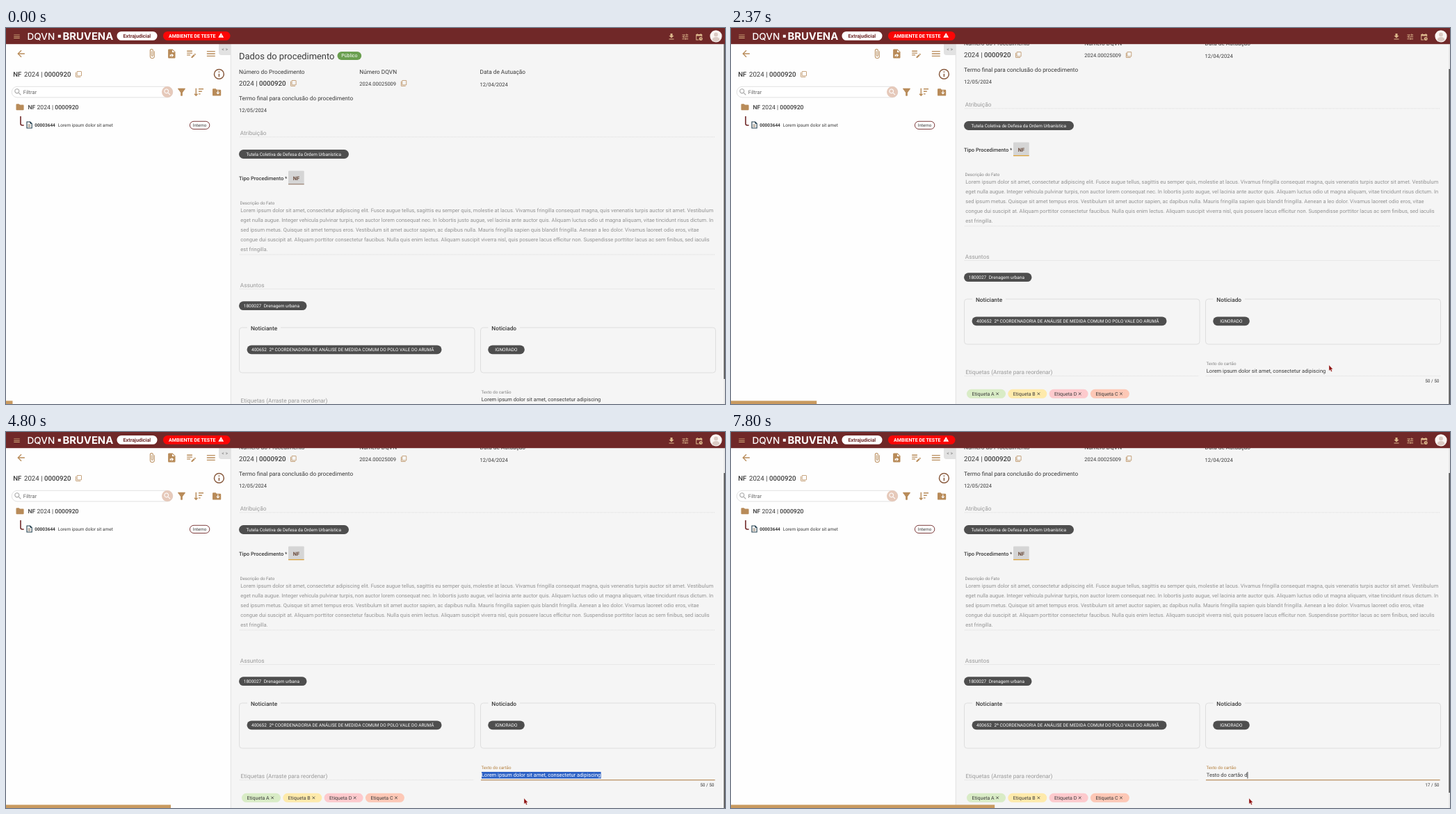
Write an HTML page that moves like this. It is 1034x541 px and loops after 8000 ms.

```html
<!DOCTYPE html>
<html lang="pt-BR">
<head>
<meta charset="utf-8">
<title>Dados do procedimento</title>
<style>
html, body { margin: 0; width: 100%; height: 100%; overflow: hidden; background: #f5f5f5; }
svg { display: block; width: 100vw; height: 100vh; }
text { font-family: Roboto, Arial, sans-serif; fill: #3a3a3a; text-rendering: geometricPrecision; }
.s11 { font-size: 6.2px; }
.s12 { font-size: 6.4625px; }
.s13 { font-size: 7px; }
.s14 { font-size: 7.54px; }
.s15 { font-size: 8.27px; }
.s16 { font-size: 8.62px; }
.s18 { font-size: 9.69px; }
.s24 { font-size: 12.925px; }
.m { font-weight: 500; }
.b { font-weight: 700; }
.mid { text-anchor: middle; }
.end { text-anchor: end; }
.dim { fill: #999; }
.para { fill: #929292; }
.w { fill: #fff; }
.chip { fill: #4e4e4e; }
.dots { stroke: #c9c9c9; stroke-width: .6; stroke-dasharray: 1 1; fill: none; }
.box { fill: none; stroke: #d8d8d8; stroke-width: .8; }
.logo { font-family: Inter, Arial, sans-serif; fill: #fff; }
.x { stroke: #333; stroke-width: .8; fill: none; }
</style>
</head>
<body>
<svg viewBox="0 0 1034 541" preserveAspectRatio="none">
  <defs>
    <clipPath id="picked"><rect id="pickedBox" y="488" height="12"/></clipPath>
  </defs>
  <rect width="1034" height="541" fill="#f5f5f5"/>

  <g id="page">
    <text class="s24" x="335" y="45">Dados do procedimento</text>
    <rect x="476.5" y="34" width="34.7" height="12" rx="6" fill="#6a9f50"/>
    <text class="s13 w mid" x="493.9" y="42.3">Público</text>
    <g class="s15">
      <text x="335" y="66.3">Número do Procedimento</text>
      <text x="508.3" y="66.3">Número DQVN</text>
      <text x="681.6" y="66.3">Data de Autuação</text>
      <text x="335" y="103.5">Termo final para conclusão do procedimento</text>
    </g>
    <text class="s18" x="335" y="83">2024 | <tspan class="m">0000920</tspan></text>
    <g class="s14">
      <text x="508.3" y="83">2024.00025009</text>
      <text x="681.6" y="83.6">12/04/2024</text>
      <text x="335" y="120.8">12/05/2024</text>
    </g>

    <text class="s15 dim" x="336.8" y="154.3">Atribuição</text>
    <path class="dots" d="M336 156.8H1020M336 326H1020M336 375.5H1020"/>
    <rect class="chip" x="335" y="175" width="158" height="13" rx="6.5"/>
    <text class="s12 w" x="345.4" y="183.8">Tutela Coletiva de Defesa da Ordem Urbanística</text>

    <text class="s14 m" x="335" y="218.8">Tipo Procedimento *</text>
    <rect x="406" y="205.5" width="22.7" height="19.8" rx="1" fill="#d5d5d5"/>
    <rect id="nfLine" x="406" y="224" width="22.7" height="1.3"/>
    <text class="s14 b mid" x="417.4" y="218.8" style="fill:#6a4b3b">NF</text>

    <text class="s11" x="336.4" y="254.4" style="fill:#858585">Descrição do Fato</text>
    <g class="s14" id="para"></g>

    <text class="s15 dim" x="336.8" y="372.5">Assuntos</text>
    <rect class="chip" x="335" y="393.3" width="97.5" height="12.8" rx="6.4"/>
    <text class="s12 w" x="341.8" y="402">1800027</text>
    <text class="s12 w" x="370.8" y="402">Drenagem urbana</text>

    <path class="box" d="M347 431H339.5a4 4 0 0 0-4 4V492a4 4 0 0 0 4 4H670a4 4 0 0 0 4-4V435a4 4 0 0 0-4-4H395"/>
    <path class="box" d="M693.5 431H686.5a4 4 0 0 0-4 4V492a4 4 0 0 0 4 4H1016.5a4 4 0 0 0 4-4V435a4 4 0 0 0-4-4H739"/>
    <text class="s15 m" x="352" y="434.7">Noticiante</text>
    <text class="s15 m" x="698.3" y="434.7">Noticiado</text>
    <rect class="chip" x="346.5" y="456.4" width="280" height="12.8" rx="6.4"/>
    <text class="s12 w" x="353" y="465.1">400652</text>
    <text class="s12 w" x="378.4" y="465.1">2ª COORDENADORIA DE ANÁLISE DE MEDIDA COMUM DO POLO VALE DO ARUMÃ</text>
    <rect class="chip" x="693.2" y="456.4" width="52.6" height="12.8" rx="6.4"/>
    <text class="s12 w mid" x="719.4" y="465.1">IGNORADO</text>

    <text class="s15 dim" x="337.6" y="539">Etiquetas (Arraste para reordenar)</text>
    <path class="dots" d="M336 541.7H672.5M683 541.7H1020"/>
    <g id="tags"></g>

    <text class="s11" id="cardLabel" x="683.4" y="526">Texto do cartão</text>
    <rect id="focusLine" x="683" y="541.2" width="336.5" height="1.1" fill="#b5864f"/>
    <text class="s12 end" id="count" x="1018.5" y="551.2"></text>
  </g>

  <g id="field">
    <text class="s14" id="value" x="683.8" y="496.3" xml:space="preserve"></text>
    <rect id="caret" y="489" width=".8" height="9.6" fill="#222"/>
    <g clip-path="url(#picked)">
      <rect x="683.8" y="489" width="172" height="9.6" fill="#2d62c6"/>
      <text class="s14 w" x="683.8" y="496.3">Lorem ipsum dolor sit amet, consectetur adipiscing</text>
    </g>
  </g>
  <rect x="1032.3" y="23" width="1.7" height="518" fill="#e6e6e6"/>
  <rect id="thumb" x="1032.3" width="1.7" fill="#5a5a5a"/>

  <rect y="23" width="323" height="518" fill="#fefefe"/>
  <rect x="322.8" y="23" width=".8" height="518" fill="#dcdcdc"/>
  <path d="M323 23H306v12a4 4 0 0 0 4 4h13z" fill="#e2e2e2"/>
  <text class="s13 mid" x="314.8" y="33.3" style="fill:#777">&lt; &gt;</text>
  <text class="s18 m" x="10.2" y="70.2">NF</text>
  <text class="s18" x="26" y="70.2">2024 | <tspan class="m">0000920</tspan></text>
  <rect x="8.3" y="84.3" width="231.5" height="15.6" rx="7.8" fill="#fff" stroke="#cfcfcf" stroke-width=".6"/>
  <text class="s14" x="24.8" y="94.8" style="fill:#666">Filtrar</text>
  <circle cx="232" cy="92.1" r="8" fill="#e6c9ba"/>
  <path d="M14.5 110.2q0-1 1-1h3.2l1.3 1.4h4.6q1 0 1 1v5.6q0 1-1 1h-9.1q-1 0-1-1z" fill="#b88b59"/>
  <text class="s16" x="31.5" y="116.6"><tspan class="m">NF</tspan> 2024 | <tspan class="m">0000920</tspan></text>
  <path d="M21 127V137.5q0 2.5 2.5 2.5h2.2" fill="none" stroke="#702828" stroke-width="1.6"/>
  <path d="M30 135h4.6l2.6 2.6v6.4h-7.2z" fill="#fff" stroke="#24404f" stroke-width="1.1"/>
  <path d="M34.4 134.6v3.2h3.2z" fill="#24404f"/>
  <path d="M31.6 139.6h3.6M31.6 141.8h3.6" stroke="#7d6a50"/>
  <text class="s12 b" x="41.2" y="141.9">00003644</text>
  <text class="s12" x="74.8" y="141.9">Lorem ipsum dolor sit amet</text>
  <rect x="264.4" y="134.3" width="28.4" height="11.2" rx="5.6" fill="#fff" stroke="#702828" stroke-width=".9"/>
  <text class="s11 mid" x="278.6" y="142.1">Interno</text>
  <path d="M273.3 86.8V97M271 94.8l2.3 2.4 2.3-2.4M277 87.7h7M277 91.3h4.8M277 94.9h2.7" fill="none" stroke="#b88b59" stroke-width="1.4"/>
  <path d="M297 88.5q0-1.2 1.2-1.2h3.4l1.4 1.5h5q1.2 0 1.2 1.2v6.4q0 1.2-1.2 1.2h-9.8q-1.2 0-1.2-1.2z" fill="#b88b59"/>
  <path d="M304.8 89.8v4.2M302.8 92.6l2 2.2 2-2.2" fill="none" stroke="#fff" stroke-width="1.1"/>

  <rect width="1034" height="23.2" fill="#702828"/>
  <text class="logo m" x="30.5" y="17" style="font-size:13.6px">DQVN</text>
  <rect x="74.8" y="9.8" width="4" height="4" fill="#fff"/>
  <text class="logo b" x="81.5" y="17" style="font-size:14.8px">BRUVENA</text>
  <rect x="159.5" y="5" width="58" height="12.8" rx="6.4" fill="#fff"/>
  <text class="b mid" x="188.4" y="13.9" style="font-size:7.2px;fill:#702828">Extrajudicial</text>
  <rect x="226" y="5" width="96.5" height="12.8" rx="6.4" fill="#fb0606"/>
  <text class="b w" x="234" y="14" style="font-size:7.05px">AMBIENTE DE TESTE</text>
  <circle cx="1021" cy="11.8" r="8.6" fill="#fbf6f3"/>
  <g fill="#dccbc4"><circle cx="1021" cy="9.4" r="2.9"/><path d="M1015.7 17.6q0-4.6 5.3-4.6t5.3 4.6q-5.3 3.6-10.6 0z"/></g>

  <g id="icons"></g>
  <rect id="bar" y="536.4" height="4.6" fill="#c99a5f"/>
  <circle id="press" r="10.7" fill="#fc6a4b" opacity=".92"/>
  <g id="beam">
    <circle r="6" fill="#f6c228" opacity=".85"/>
    <path d="M-1.5-4H1.5M0-4V4M-1.5 4H1.5" stroke="#a3660f" stroke-width=".8"/>
  </g>
  <path id="arrow" d="M0 0V8.2L1.8 6.6 3.1 9.4 4.5 8.8 3.2 6.1H5.5z" fill="#8d0f0f" stroke="#f0d8d4" stroke-width=".4"/>
</svg>
<script>
const $ = id => document.getElementById(id);
const NS = 'http://www.w3.org/2000/svg';

function add(parent, tag, attrs, content) {
  const el = document.createElementNS(NS, tag);
  for (const k in attrs) el.setAttribute(k, attrs[k]);
  if (content) el.textContent = content;
  parent.append(el);
}

function icon(parent, d, x, y, scale, fill = '#b88b59') {
  add(parent, 'path', { d, fill, transform: `translate(${x} ${y}) scale(${scale}) translate(-12 -12)` });
}

const COPY = 'M3 5H1v16c0 1.1.9 2 2 2h16v-2H3V5zm18-4H7c-1.1 0-2 .9-2 2v14c0 1.1.9 2 2 2h14c1.1 0 2-.9 2-2V3c0-1.1-.9-2-2-2zm0 16H7V3h14v14z';
const FIND = 'M15.5 14h-.79l-.28-.27A6.5 6.5 0 1 0 13.73 14.43l.27.28v.79l5 4.99L20.49 19zm-6 0a4.5 4.5 0 1 1 0-9 4.5 4.5 0 0 1 0 9z';
const MENU = 'M3 18h18v-2H3v2zm0-5h18v-2H3v2zm0-7v2h18V6H3z';
const GOLD = '#dcb88c';
const fixed = $('icons');

// header
icon(fixed, MENU, 15.5, 12.2, .47, '#d0a878');
icon(fixed, 'M1 21h22L12 2 1 21zm12-3h-2v-2h2v2zm0-4h-2v-4h2v4z', 309.2, 10.6, .36, '#fff');
icon(fixed, 'M5 20h14v-2H5v2zM19 9h-4V3H9v6H5l7 7 7-7z', 957, 12.6, .5, GOLD);
icon(fixed, 'M3 17v2h6v-2H3zM3 5v2h10V5H3zm10 16v-2h8v-2h-8v-2h-2v6h2zM7 9v2H3v2h4v2h2V9H7zm14 4v-2H11v2h10zm-6-4h2V7h4V5h-4V3h-2v6z', 976.8, 12.8, .48, GOLD);
icon(fixed, 'M3 4h3V2h2v2h8V2h2v2h3v7h-2V9H5v10h6v2H3zM17 12a5 5 0 1 1 0 10 5 5 0 0 1 0-10zm-.8 2v3.5l2.6 1.6.8-1.2-1.9-1.1V14z', 996.7, 13, .5, GOLD);
// side panel
icon(fixed, 'M20 11H7.83l5.59-5.59L12 4l-8 8 8 8 1.41-1.41L7.83 13H20z', 21.6, 37, .66);
icon(fixed, 'M16.5 6v11.5a4 4 0 0 1-8 0V5a2.5 2.5 0 0 1 5 0v10.5a1 1 0 0 1-2 0V6H10v9.5a2.5 2.5 0 0 0 5 0V5a4 4 0 0 0-8 0v12.5a5.5 5.5 0 0 0 11 0V6z', 210, 37, .64);
icon(fixed, 'M6 2c-1.1 0-2 .9-2 2v16c0 1.1.9 2 2 2h12c1.1 0 2-.9 2-2V8l-6-6z', 238.3, 37, .65);
icon(fixed, 'M13 3.5V9h5.5zM8 18v-4h4v-2.5l4.5 4-4.5 4V16h-2v2z', 238.3, 37, .65, '#fff');
icon(fixed, 'M3 10h11v2H3zm0-4h11v2H3zm0 8h7v2H3zm15-1.13.71-.71q.7-.6 1.41 0l.71.71q.6.7 0 1.41l-.71.71zm-.7.71-5.3 5.3V21h2.12l5.3-5.3z', 266.5, 36.8, .7);
icon(fixed, MENU, 294.8, 37, .66);
icon(fixed, 'M11 7h2v2h-2zm0 4h2v6h-2zM12 2a10 10 0 1 0 0 20 10 10 0 0 0 0-20zm0 18a8 8 0 1 1 0-16 8 8 0 0 1 0 16z', 306.4, 66.4, .77, '#8a5c40');
icon(fixed, COPY, 104.5, 66.5, .39);
icon(fixed, FIND, 17.2, 92.2, .55, '#aaa');
icon(fixed, FIND, 232, 92.2, .52, '#fff');
icon(fixed, 'M4.25 5.61C6.27 8.2 10 13 10 13v6q0 1 1 1h2q1 0 1-1v-6l5.74-7.39q.8-1.4-.79-1.61H5.04q-1.5.2-.79 1.61z', 252.5, 92.2, .68);
// page
icon($('page'), COPY, 413.3, 79.5, .38);
icon($('page'), COPY, 572, 79.5, .38);

[
  'Lorem ipsum dolor sit amet, consectetur adipiscing elit. Fusce augue tellus, sagittis eu semper quis, molestie at lacus. Vivamus fringilla consequat magna, quis venenatis turpis auctor sit amet. Vestibulum',
  'eget nulla augue. Integer vehicula pulvinar turpis, non auctor lorem consequat nec. In lobortis justo augue, vel lacinia ante auctor quis. Aliquam luctus odio ut magna aliquam, vitae tincidunt risus dictum. In',
  'sed ipsum metus. Quisque sit amet tempus eros. Vestibulum sit amet auctor sapien, ac dapibus nulla. Mauris fringilla sapien quis blandit fringilla. Aenean a leo dolor. Vivamus laoreet odio eros, vitae',
  'congue dui suscipit at. Aliquam porttitor consectetur faucibus. Nulla quis enim lectus. Aliquam suscipit viverra nisl, quis posuere lacus efficitur non. Suspendisse porttitor lacus ac sem finibus, sed iaculis',
  'est fringilla.'
].forEach((line, n) => add($('para'), 'text', { class: 'para', x: 337.3, y: 265.1 + 14 * n }, line));

[['A', '#d9ecc6'], ['B', '#feeaab'], ['D', '#fdcacd'], ['C', '#fdc8b6']].forEach(([name, fill], n) => {
  const x = 339 + 59.3 * n;
  add($('tags'), 'rect', { x, y: 560.8, width: 56, height: 13, rx: 6.5, fill });
  add($('tags'), 'text', { x: x + 7.5, y: 569.8, style: 'font-size:7.05px' }, 'Etiqueta ' + name);
  add($('tags'), 'path', { class: 'x', d: `M${x + 42.3} 565.5l3.6 3.6m0-3.6l-3.6 3.6` });
});

const LOOP = 8000;
const OLD = 'Lorem ipsum dolor sit amet, consectetur adipiscing';
const NEW = 'Testo do cartão d';
const LEFT = 683.8, RIGHT = 855.8;

const CLOCK = [[0, 0], [200, 1], [1170, 6], [1570, 8], [1780, 9], [2370, 12], [2970, 15], [3190, 16], [3590, 18],
  [3790, 19], [4800, 24], [4990, 25], [5790, 29], [6000, 30], [7800, 39], [8000, 40]];
// [step, x, y] of the pointer
const PATH = [[1, 984, 470], [6, 678, 281], [8, 678, 281], [12, 860, 485], [13, 867, 494], [15, 861, 494.5],
  [19, 684, 494], [21, 684, 494], [24, 745, 527], [40, 745, 527]];

const mix = (a, b, u) => a + (b - a) * u;

function span(keys, v) {
  let n = 0;
  while (n < keys.length - 2 && v >= keys[n + 1][0]) n++;
  const a = keys[n], b = keys[n + 1];
  return [a, b, Math.min(1, Math.max(0, (v - a[0]) / (b[0] - a[0])))];
}

function stepAt(t) {
  const [a, b, u] = span(CLOCK, t);
  return Math.min(39, Math.floor(mix(a[1], b[1], u) + 1e-6));
}

function pointerAt(step) {
  const [a, b, u] = span(PATH, step);
  const e = u * u * (3 - 2 * u);
  return [mix(a[1], b[1], e), mix(a[2], b[2], e)];
}

const set = (id, k, v) => $(id).setAttribute(k, v);
const show = (id, on) => { $(id).style.display = on ? '' : 'none'; };
const move = (id, x, y) => set(id, 'transform', `translate(${x} ${y})`);

let last = -1;
function draw(step) {
  const scrolled = step >= 8, focused = step >= 14, typing = step >= 25;
  const shift = scrolled ? 0 : 41;
  const dragging = step >= 15 && step <= 20;
  const overField = step >= 13 && step <= 20;
  const [x, y] = pointerAt(step);

  set('bar', 'width', 9.48 * (step + 1));
  move('page', 0, shift - 41);
  move('field', 0, shift);
  set('nfLine', 'fill', scrolled ? '#dca43c' : '#a18b7c');
  set('thumb', 'y', scrolled ? 59 : 23);
  set('thumb', 'height', typing ? 460 : 482);

  $('cardLabel').style.fill = focused ? '#b5803f' : '#858585';
  show('focusLine', focused);

  const text = typing ? NEW.slice(0, Math.round(1.1 * step - 25.9)) : OLD;
  $('value').textContent = text;
  $('count').textContent = text.trim().length + ' / 50';
  show('caret', typing || step === 14 || step === 15);
  set('caret', 'x', LEFT + $('value').getComputedTextLength());

  const from = step > 15 && !typing ? Math.max(LEFT, step >= 19 ? LEFT : x) : RIGHT;
  set('pickedBox', 'x', from);
  set('pickedBox', 'width', Math.max(0, RIGHT - from));

  show('press', dragging || step === 6 || step === 7);
  move('press', dragging && step < 19 ? x + 7 : x - .3, y);
  show('beam', overField);
  move('beam', x, y + .3);
  show('arrow', step >= 1 && !overField);
  move('arrow', x, y);
}

function tick() {
  const step = stepAt(performance.now() % LOOP);
  if (step !== last) draw(last = step);
  requestAnimationFrame(tick);
}
tick();
</script>
</body>
</html>
```
